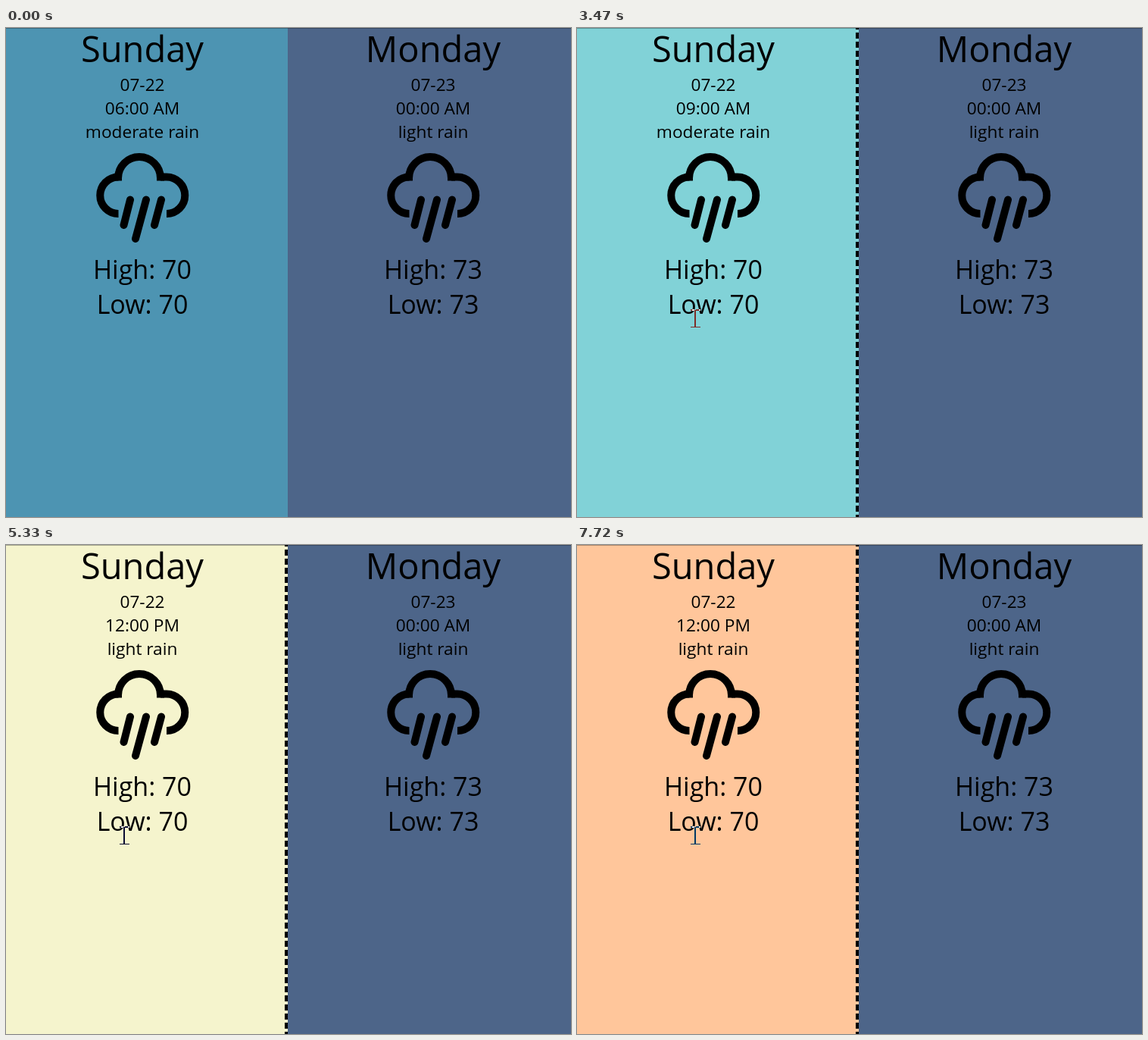
An HTML page for the animation above (8000 ms loop, 746x645 px).

```html
<!DOCTYPE html>
<html lang="en">
<head>
<meta charset="utf-8">
<title>Two day forecast</title>
<style>
html, body { margin: 0; width: 100%; height: 100%; overflow: hidden; }
svg { display: block; width: 746px; height: 645px; }
text { font-family: "Open Sans", "Noto Sans", sans-serif; text-anchor: middle; }
.day { font-size: 47px; }
.info { font-size: 22.67px; }
.temp { font-size: 34px; }
.icon { fill: none; stroke: #000; stroke-width: 10; }
.drop { stroke-linecap: round; }
#cursor { fill: #fff; mix-blend-mode: difference; }
</style>
</head>
<body>
<svg viewBox="0 0 746 645">
  <defs>
    <g id="rain" class="icon">
      <path d="M148.500 245A24.250 24.250 0 0 1 148.500 196.500"/>
      <path d="M148 201.500V198A28 28 0 0 1 204 198V201.500"/>
      <path d="M204 196.500H212A24.250 24.250 0 0 1 212 245"/>
      <path class="drop" d="M164 226.500L155.500 260M185 226.500L171 278M205 226.500L196 260"/>
    </g>
  </defs>
  <rect id="sky" width="372" height="645"/>
  <rect x="372" width="374" height="645" fill="#4d6589"/>
  <rect width="746" height="1" fill-opacity=".3"/>
  <path id="edge" d="M370 -6V645" stroke="#000" stroke-width="4" stroke-dasharray="8 4"/>
  <g>
    <text class="day" x="180" y="45">Sunday</text>
    <text class="info" x="180" y="83">07-22</text>
    <text class="info" x="180" y="114" id="hour"></text>
    <text class="info" x="180" y="145" id="kind"></text>
    <use href="#rain"/>
    <text class="temp" x="180" y="331">High: 70</text>
    <text class="temp" x="180" y="377">Low: 70</text>
  </g>
  <g transform="translate(384)">
    <text class="day" x="180" y="45">Monday</text>
    <text class="info" x="180" y="83">07-23</text>
    <text class="info" x="180" y="114">00:00 AM</text>
    <text class="info" x="180" y="145">light rain</text>
    <use href="#rain"/>
    <text class="temp" x="180" y="331">High: 73</text>
    <text class="temp" x="180" y="377">Low: 73</text>
  </g>
  <path id="cursor" d="M-6 -12H-1V-11H1V-12H7V-10H1V11H7V12H-6V11H-1V-10H-6Z"/>
</svg>
<script>
const LOOP = 8000, TICK = 76, LEAD = 40, FADE = 500;
const $ = id => document.getElementById(id);

// start time, sky colour reached
const skies = [
  [-1000, [77, 148, 178]],
  [1220, [75, 153, 183]],
  [2290, [84, 188, 210]],
  [3310, [153, 221, 218]],
  [4310, [244, 245, 210]],
  [5330, [255, 234, 137]],
  [6340, [255, 216, 146]],
  [7340, [255, 198, 155]]
];
const reports = [
  [0, "06:00 AM", "moderate rain"],
  [2290, "09:00 AM", "moderate rain"],
  [5330, "12:00 PM", "light rain"]
];
const moves = [
  [820, 449, 430],
  [900, 330, 404],
  [970, 205, 388],
  [1050, 156, 383]
];

const lastIndex = (rows, t) => rows.findLastIndex(row => row[0] <= t);

// cubic-bezier(.25, .1, .25, 1)
function ease(x) {
  if (x >= 1) return 1;
  const curve = (a, b, u) => 3 * a * u * (1 - u) ** 2 + 3 * b * u * u * (1 - u) + u ** 3;
  let lo = 0, hi = 1;
  for (let i = 0; i < 20; i++) {
    const mid = (lo + hi) / 2;
    if (curve(.25, .25, mid) < x) lo = mid; else hi = mid;
  }
  return curve(.1, 1, lo);
}

function skyAt(t) {
  const i = lastIndex(skies, t);
  const [start, to] = skies[i];
  if (!i) return to;
  const from = skies[i - 1][1];
  const held = Math.floor((t - start) / TICK) * TICK;
  const p = ease((held + LEAD) / FADE);
  return to.map((v, k) => Math.round(from[k] + (v - from[k]) * p));
}

function setText(id, value) {
  if ($(id).textContent !== value) $(id).textContent = value;
}

function draw(t) {
  $("sky").setAttribute("fill", `rgb(${skyAt(t)})`);
  const [, hour, kind] = reports[lastIndex(reports, t)];
  setText("hour", hour);
  setText("kind", kind);

  const move = moves[lastIndex(moves, t)];
  $("cursor").style.display = move ? "" : "none";
  $("edge").style.display = move && move[1] < 372 ? "" : "none";
  if (move) $("cursor").setAttribute("transform", `translate(${move[1]} ${move[2]})`);
}

const begin = performance.now();
function loop() {
  draw((performance.now() - begin) % LOOP);
  requestAnimationFrame(loop);
}
loop();
</script>
</body>
</html>
```
